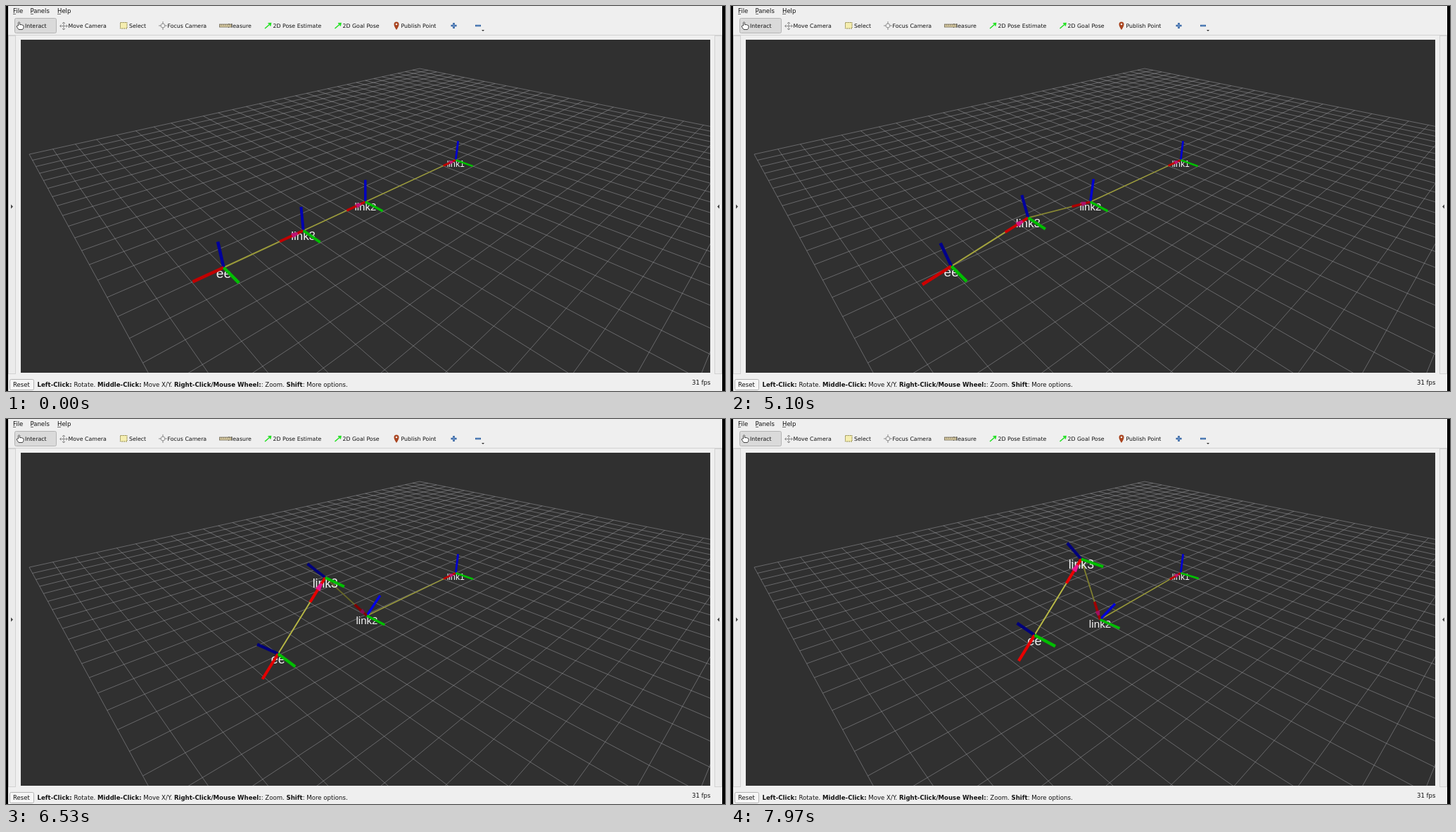
Recreate the animation shown at these times as an HTML page with a canvas. Size 1022 by 548 pixels, loop 8 s.

```html
<!DOCTYPE html>
<html lang="en">
<head>
<meta charset="utf-8">
<title>Robot arm viewer</title>
<style>
html, body { margin: 0; width: 100%; height: 100%; overflow: hidden; background: #efefef; }
svg, canvas { position: absolute; left: 0; top: 0; }
canvas { left: 21px; top: 48px; }
text { font-family: "DejaVu Sans", sans-serif; font-size: 8.5px; fill: #111; white-space: pre; }
.tools text { font-size: 7.85px; }
.b { font-weight: bold; }
</style>
</head>
<body>
<svg width="1022" height="548" viewBox="0 0 1022 548">
  <rect width="1022" height="548" fill="#efefef"/>
  <path d="M0 0h3v548h-3zM1018 0h4v548h-4z" fill="#000"/>
  <path d="M3 41.5H1018" stroke="#d2d2d2"/>
  <g fill="#ebebeb" stroke="#d2d2d2">
    <rect x="3.5" y="42.5" width="10" height="481"/>
    <rect x="1007.5" y="42.5" width="10" height="481"/>
  </g>
  <path d="M7 282.5l3 3-3 3zM1014 282.5l-3 3 3 3z" fill="#444"/>

  <text x="10" y="10">File</text>
  <text x="34.5" y="10">Panels</text>
  <text x="73" y="10">Help</text>
  <path d="M10 11.5h4M35 11.5h4M73 11.5h5" stroke="#333" stroke-width=".7"/>

  <rect x="12.5" y="17.5" width="59" height="21" rx="2" fill="#dadada" stroke="#b4b4b4"/>
  <g class="tools">
    <text x="27" y="31">Interact</text>
    <text x="88.5" y="31">Move Camera</text>
    <text x="175" y="31">Select</text>
    <text x="229.5" y="31">Focus Camera</text>
    <text x="315.5" y="31">Measure</text>
    <text x="379.5" y="31">2D Pose Estimate</text>
    <text x="478.5" y="31">2D Goal Pose</text>
    <text x="561.5" y="31">Publish Point</text>
  </g>
  <path d="M17.5 28V23.5q1-1.500 2 0V26.500q3-.5 5.500 1.500V31l-1.500 2.500H18L15 29q1-1.500 2.500-1z" fill="#fff" stroke="#333" stroke-width=".9"/>
  <g fill="none" stroke="#8a8a8a">
    <path d="M77 28.500H87M82 23.500V33.500M80 25l2-2 2 2M80 32l2 2 2-2M78.500 26.500l-2 2 2 2M85.500 26.500l2 2-2 2"/>
    <circle cx="223" cy="28" r="3" stroke="#999"/>
    <path d="M217 28h4M225 28h4M223 22v4M223 30v4" stroke="#888"/>
  </g>
  <rect x="162.500" y="23.500" width="9.500" height="8.500" fill="#f5eeb0" stroke="#8b8340" stroke-dasharray="2 1"/>
  <rect x="303.500" y="26" width="17" height="4" fill="#d6c9a0" stroke="#6e6654" stroke-width=".8"/>
  <path d="M306 26v2M309 26v2M312 26v2M315 26v2M318 26v2" stroke="#6e6654" stroke-width=".7"/>
  <g fill="none" stroke="#1fe01f" stroke-width="1.500">
    <path d="M368 32l8-7M372.500 24.800l4-.3-.8 4"/>
    <path d="M467.500 32l8-7M472 24.800l4-.3-.8 4"/>
  </g>
  <path d="M555 34q-3.500-5-3.500-8a3.500 3.500 0 0 1 7 0q0 3-3.500 8z" fill="#a9441f"/>
  <circle cx="555" cy="26" r="1.300" fill="#efefef"/>
  <path d="M632.500 28h8M636.500 24v8M667 28h8" stroke="#2f5f9f" stroke-width="2.600"/>
  <path d="M634 28h5M636.500 25.500v5M668 28h6" stroke="#7ea6d8" stroke-width=".8"/>
  <path d="M676 34h4l-2 2z" fill="#333"/>

  <rect x="5.500" y="531.500" width="34" height="15" rx="2" fill="#f6f6f6" stroke="#b4b4b4"/>
  <text x="10" y="542">Reset</text>
  <text x="44.500" y="541.500" style="font-size:8.600px"><tspan class="b">Left-Click:</tspan> Rotate. <tspan class="b">Middle-Click:</tspan> Move X/Y. <tspan class="b">Right-Click/Mouse Wheel:</tspan>: Zoom. <tspan class="b">Shift</tspan>: More options.</text>
  <text x="975" y="539">31 fps</text>
</svg>
<canvas id="view" width="980" height="474"></canvas>
<script>
const ctx = document.getElementById("view").getContext("2d");
const LOOP = 8000, FOCAL = 572.16, SIN = 0.5053, COS = 0.863;
const HALF = 5, CELLS = 30, AXIS = 0.325, HEAD = 0.16;
const CAM = [5.16, 3.38, 2.643], LIGHT = [Math.SQRT1_2, 0, Math.SQRT1_2];
const RED = [255, 0, 0], GREEN = [0, 190, 0], BLUE = [0, 0, 245];
const PINK = [255, 25, 153], YELLOW = [204, 204, 77];

const rad = d => d * Math.PI / 180;
const along = (p, d, s) => p.map((v, i) => v + d[i] * s);
const dot = (a, b) => a[0] * b[0] + a[1] * b[1] + a[2] * b[2];

// World point to viewport pixel plus depth
function project([x, y, z]) {
  const side = 1.459 - 0.7304 * x + 0.683 * y;
  const fwd = 5.994 - 0.683 * x - 0.7304 * y;
  const drop = CAM[2] - z;
  const depth = fwd * COS + drop * SIN;
  return [490 + FOCAL * side / depth, 237 + FOCAL * (drop * COS - fwd * SIN) / depth, depth];
}

function shade(color, p, d) {
  const v = CAM.map((c, i) => c - p[i]);
  const n = along(v, d, -dot(v, d));
  const lit = Math.max(0, dot(n, LIGHT)) / Math.sqrt(dot(n, n));
  return `rgb(${color.map(c => Math.round(c * Math.min(1, 0.5 + 0.58 * lit)))})`;
}

// Tapered rod from p along d, with world diameters at both ends
function rod(p, d, from, to, w1, w2, color) {
  const [x1, y1, z1] = project(along(p, d, from));
  const [x2, y2, z2] = project(along(p, d, to));
  const len = Math.hypot(x2 - x1, y2 - y1) || 1;
  const nx = (y1 - y2) / len, ny = (x2 - x1) / len;
  const r1 = w1 * FOCAL / z1 / 2, r2 = w2 * FOCAL / z2 / 2;
  ctx.fillStyle = shade(color, p, d);
  ctx.beginPath();
  ctx.moveTo(x1 + nx * r1, y1 + ny * r1);
  ctx.lineTo(x2 + nx * r2, y2 + ny * r2);
  ctx.lineTo(x2 - nx * r2, y2 - ny * r2);
  ctx.lineTo(x1 - nx * r1, y1 - ny * r1);
  ctx.fill();
}

function drawGrid() {
  ctx.strokeStyle = "rgba(160,160,164,.5)";
  ctx.lineWidth = 1;
  const line = (p, q) => {
    const a = project(p), b = project(q);
    ctx.beginPath();
    ctx.moveTo(a[0], a[1]);
    ctx.lineTo(b[0], b[1]);
    ctx.stroke();
  };
  for (let i = 0; i <= CELLS; i++) {
    const s = -HALF + 2 * HALF * i / CELLS;
    line([s, -HALF, 0], [s, HALF, 0]);
    line([-HALF, s, 0], [HALF, s, 0]);
  }
}

function drawLabel(name, p) {
  const [x, y, depth] = project(p);
  const size = 80 / depth;
  ctx.font = `${size}px "Liberation Sans", Arial, sans-serif`;
  ctx.textAlign = "center";
  ctx.fillStyle = "#f2f2f2";
  ctx.fillText(name, x, y + size * 0.78);
}

// Joint angles: a straight arm folds, then turns while folding on
function pose(t) {
  const ramp = (a, b) => Math.min(1, Math.max(0, (t - a) / (b - a)));
  const fold = ramp(4775, 6250), turn = ramp(6250, 7970);
  return { yaw: 0.088 * turn, up: rad(45 * fold + 25 * turn), down: rad(45 * fold - 4 * turn) };
}

function drawArm(t) {
  const { yaw, up, down } = pose(t);
  const c = Math.cos(yaw), s = Math.sin(yaw);
  const tilt = a => ({
    x: [c * Math.cos(a), s * Math.cos(a), Math.sin(a)],
    y: [-s, c, 0],
    z: [-c * Math.sin(a), -s * Math.sin(a), Math.cos(a)]
  });
  const joints = [["link1", 0, 2], ["link2", up, 1], ["link3", -down, 1], ["ee", -down, 0]];
  let p = [0, 0, 0];
  const frames = joints.map(([name, a, length]) => {
    const f = { name, p, length, ...tilt(a) };
    p = along(p, f.x, length);
    return f;
  });
  for (const f of frames)
    if (f.length) rod(f.p, f.x, HEAD, f.length, 0.015, 0.015, YELLOW);
  for (const f of frames) {
    drawLabel(f.name, f.p);
    rod(f.p, f.z, 0, AXIS, 0.032, 0.032, BLUE);
    rod(f.p, f.x, 0, AXIS, 0.032, 0.032, RED);
    if (f.length) rod(f.p, f.x, HEAD / 2, HEAD, 0.03, 0.06, PINK);
    rod(f.p, f.y, 0, AXIS, 0.032, 0.032, GREEN);
  }
}

function draw(now) {
  ctx.fillStyle = "#303030";
  ctx.fillRect(0, 0, 980, 474);
  drawGrid();
  drawArm(now % LOOP);
}

const start = performance.now();
function tick() {
  draw(performance.now() - start);
  requestAnimationFrame(tick);
}
draw(0);
requestAnimationFrame(tick);
</script>
</body>
</html>
```
